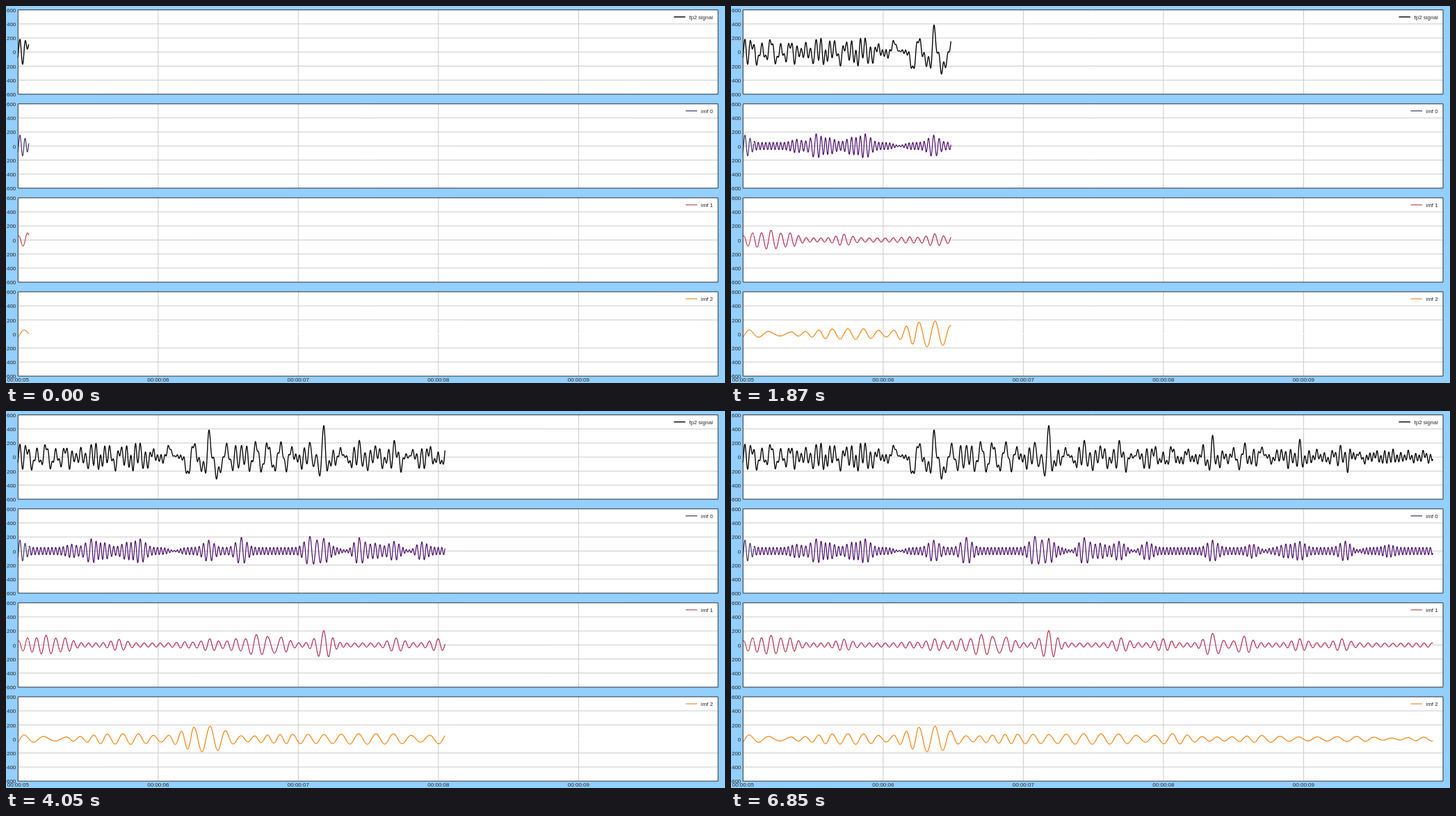
These frames come from a looping animation (1034 by 542 pixels, 7230 ms). An HTML page with a canvas:

```html
<!DOCTYPE html>
<html lang="en">
<head>
<meta charset="utf-8">
<title>Signal decomposition</title>
<style>
html, body { margin: 0; width: 100%; height: 100%; overflow: hidden; background: #93cfff; }
canvas { display: block; }
</style>
</head>
<body>
<canvas id="stage" width="1034" height="542"></canvas>
<script>
const ctx = document.getElementById('stage').getContext('2d');
const LEFT = 17.3, RIGHT = 1024, SECOND = 201.53, HEIGHT = 121.2, UNIT = HEIGHT / 1200;
const LOOP = 7230, BEAT = 311, STRIDE = 31.5, STEP = 0.25, HEAD = 33;
const FONT = '8px "Liberation Sans", Arial, sans-serif';

const xs = Array.from({ length: (1010 - LEFT) / STEP | 0 }, (_, i) => LEFT + i * STEP);
const bell = (x, mid, width) => Math.exp(-(((x - mid) / width) ** 2));

// A carrier that swells or fades at a few crests [x, amplitude].
// Its period follows the amplitude; every key falls on a whole cycle.
function wave({ base, width, period, keys }) {
  const amps = xs.map(x => {
    let sum = 0, total = 0;
    for (const [mid, peak] of keys) {
      const w = bell(x, mid, width);
      sum += w * (peak - base);
      total += w;
    }
    return base + sum / Math.max(1, total);
  });
  let turn = 0;
  const turns = amps.map(a => turn += STEP / period(a));
  const marks = keys.map(k => turns[Math.round((k[0] - LEFT) / STEP)]);

  return xs.map((x, i) => {
    const next = keys.findIndex(k => k[0] > x);
    let phase;
    if (next < 0) phase = turns[i] - marks[marks.length - 1];
    else if (next === 0) phase = turns[i] - marks[0];
    else {
      const a = marks[next - 1], gap = marks[next] - a;
      phase = (turns[i] - a) / gap * Math.max(1, Math.round(gap));
    }
    return amps[i] * Math.cos(2 * Math.PI * phase);
  });
}

const imf0 = wave({
  base: 52, width: 10, period: a => 4 + 0.025 * a,
  keys: [[20, 155], [94.5, 98], [122.5, 175], [142, 118], [173.5, 125], [193, 175], [242, 8],
    [291.5, 155], [338.5, 195], [437, 210], [457, 180], [490, 12], [508, 198], [531, 112],
    [558, 140], [580, 10], [598, 135], [692.5, 155], [752, 115], [764, 10], [798, 100],
    [818, 138], [883.5, 150], [900, 16], [946, 90]]
});
const imf1 = wave({
  base: 29, width: 14, period: a => 10.2 + 0.035 * a,
  keys: [[31, 100], [57.5, 140], [85, 100], [162.5, 82], [257, 45], [293, 88], [330.5, 88],
    [360, 158], [376, 112], [396, 115], [421, 28], [457, 205], [490, 28], [561, 100],
    [621.5, 88], [692.5, 165], [738, 125], [818, 88], [878.5, 88], [952, 25]]
});
const imf2 = wave({
  base: 28, width: 30, period: () => 23,
  keys: [[26, 72], [54, 22], [87, 28], [145.5, 70], [190.5, 80], [234, 15], [270, 185],
    [293.5, 200], [338.5, 25], [376, 58], [412, 70], [457, 62], [507, 75], [557, 72],
    [635, 76], [763, 50], [843, 28], [900, 38], [950, 12]]
});

const drift = x => 95 * bell(x, 240, 9) - 110 * bell(x, 256, 9) - 110 * bell(x, 306, 8) + 40 * bell(x, 764, 8);
const signal = xs.map((x, i) => imf0[i] + imf1[i] + imf2[i] + drift(x));

const panels = [
  { label: 'fp2 signal', data: signal, head: '#000', color: '#000', width: 1.35, key: 960.5 },
  { label: 'imf 0', data: imf0, head: '#43336b', color: '#4a0c6b', width: 1.2, key: 977.5 },
  { label: 'imf 1', data: imf1, head: '#c04a50', color: '#b22e51', width: 1.2, key: 977.5 },
  { label: 'imf 2', data: imf2, head: '#ee8a30', color: '#f5820f', width: 1.2, key: 977.5 }
];

// Strides the pen takes on each beat.
const pace = '1211221121212112112112';

function line(x1, y1, x2, y2, color, width) {
  ctx.strokeStyle = color;
  ctx.lineWidth = width;
  ctx.beginPath();
  ctx.moveTo(x1, y1);
  ctx.lineTo(x2, y2);
  ctx.stroke();
}

function text(str, x, y, align) {
  ctx.fillStyle = '#262626';
  ctx.textAlign = align;
  ctx.fillText(str, x, y);
}

function trace(data, zero, from, to, color, width) {
  ctx.strokeStyle = color;
  ctx.lineWidth = width;
  ctx.beginPath();
  xs.forEach((x, i) => {
    if (x >= from && x <= to) ctx.lineTo(x, zero - data[i] * UNIT);
  });
  ctx.stroke();
}

function drawPanel(p, i, end) {
  const top = 5.6 + 135.1 * i, bottom = top + HEIGHT, zero = top + HEIGHT / 2;
  ctx.fillStyle = '#fff';
  ctx.fillRect(LEFT, top, RIGHT - LEFT, HEIGHT);

  for (let s = 1; s < 5; s++) {
    const x = LEFT + s * SECOND;
    line(x, top, x, bottom, '#cbcbcb', 1);
  }
  for (let v = -600; v <= 600; v += 200) {
    const y = zero - v * UNIT;
    const hidden = i === 3 && v === 0;
    if (Math.abs(v) < 600) line(LEFT, y, RIGHT, y, hidden ? '#fff' : '#cbcbcb', 1);
    text(v < 0 ? '\u2212' + -v : String(v), 14.3, y + 3.2, 'right');
  }

  if (end > HEAD) trace(p.data, zero, HEAD, end, p.color, p.width);
  trace(p.data, zero, LEFT, Math.min(end, HEAD), p.head, p.width);

  ctx.strokeStyle = '#2f3338';
  ctx.lineWidth = 1;
  ctx.strokeRect(LEFT, top, RIGHT - LEFT, HEIGHT);

  const ky = top + 10.1;
  line(p.key, ky, p.key + 16.5, ky, p.head, p.width);
  text(p.label, 1016.7, top + 13.2, 'right');
}

function draw(ms) {
  const beat = Math.floor((ms + 10) / BEAT);
  const strides = [...pace.slice(0, beat)].reduce((sum, n) => sum + +n, 0);
  const end = HEAD + STRIDE * strides;
  ctx.fillStyle = '#93cfff';
  ctx.fillRect(0, 0, 1034, 542);
  ctx.font = FONT;
  ctx.lineJoin = 'round';
  panels.forEach((p, i) => drawPanel(p, i, end));
  for (let s = 0; s < 5; s++) text('00:00:0' + (5 + s), LEFT + s * SECOND, 540.4, 'center');
}

const start = performance.now();
function tick() {
  draw((performance.now() - start) % LOOP);
  requestAnimationFrame(tick);
}
tick();
</script>
</body>
</html>
```
